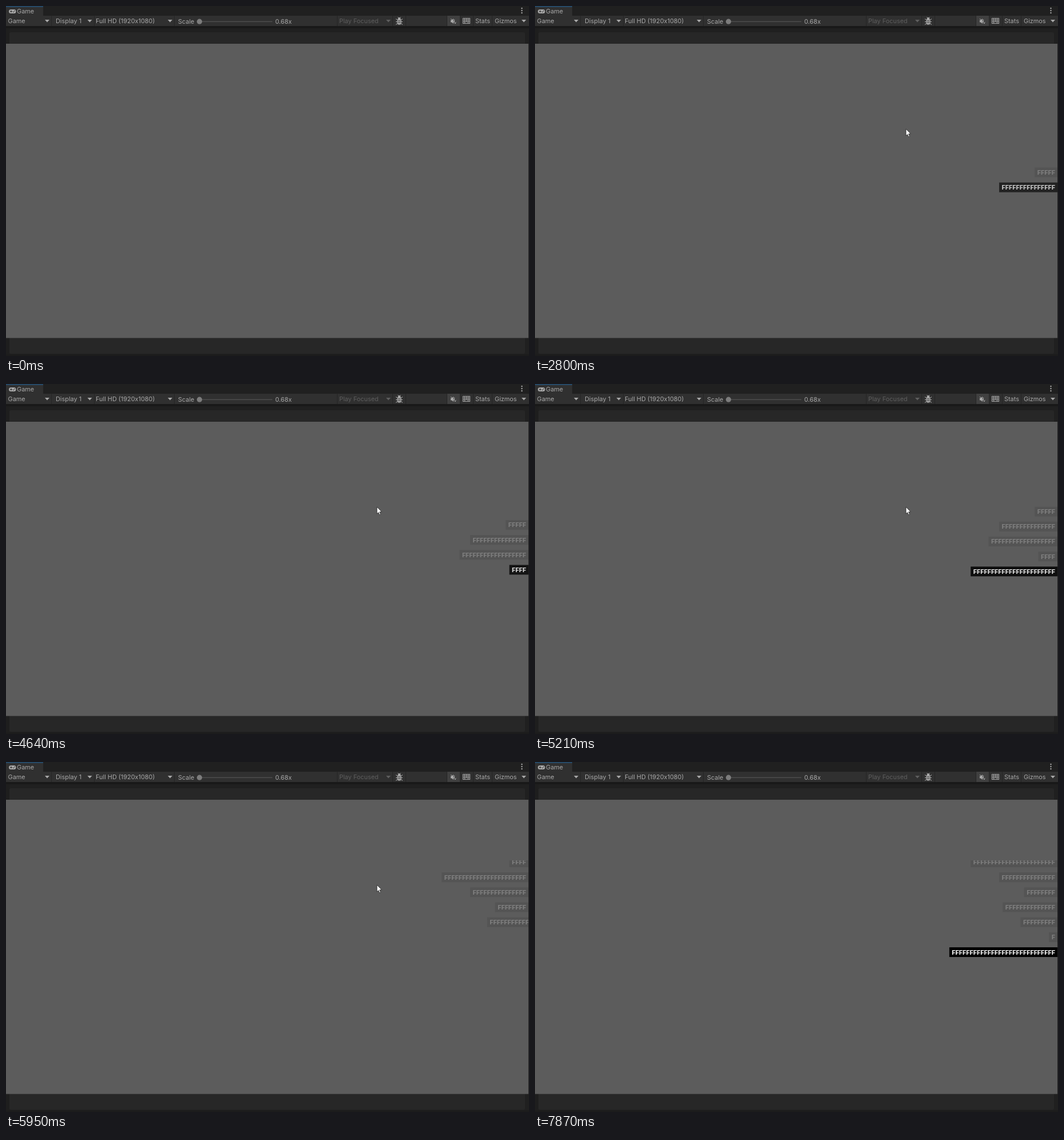
Animation of 915 by 612 pixels, one loop 8670 ms. Source, as an HTML page with a canvas:

```html
<!DOCTYPE html>
<html lang="en">
<head>
<meta charset="utf-8">
<title>Game view</title>
<style>
html, body { margin: 0; width: 100%; height: 100%; overflow: hidden; background: #202020; }
canvas { display: block; }
</style>
</head>
<body>
<canvas id="stage" width="915" height="612"></canvas>
<script>
const ctx = document.getElementById('stage').getContext('2d');
const LOOP = 8670, ROW = 26.17, SCROLL = 110, ARRIVE = 545, SPEED = 0.62;
const INK = '#a8a8a8', DIM = '#5e5e5e', BAR = '#303030';

const clamp = v => Math.min(1, Math.max(0, v));
const mix = (a, b, k) => a + (b - a) * k;
const ease = p => p < 0.5 ? 2 * p * p : 1 - 2 * (1 - p) ** 2;
const grey = v => `rgb(${v},${v},${v})`;

// Five slow, slightly uneven taps, then a quick burst that slows down.
function tapTime(i) {
  const k = i - 5;
  return k < 0 ? 910 + 929 * i + (i % 2 ? 27 : -27) : 5178 + 115 * k + 9 * k * k;
}

const messages = [5, 15, 18, 4, 23, 15, 8, 14, 9, 1, 29]
  .map((count, i) => ({ text: 'F'.repeat(count), start: tapTime(i) }));

function rect(x, y, w, h, color) {
  ctx.fillStyle = color;
  ctx.fillRect(x, y, w, h);
}

function round(x, y, w, h, r, color) {
  ctx.fillStyle = color;
  ctx.beginPath();
  ctx.roundRect(x, y, w, h, r);
  ctx.fill();
}

const dot = (x, y, r, color) => round(x - r, y - r, 2 * r, 2 * r, r, color);

function line(x1, y1, x2, y2, color = INK) {
  ctx.strokeStyle = color;
  ctx.lineWidth = 1;
  ctx.beginPath();
  ctx.moveTo(x1, y1);
  ctx.lineTo(x2, y2);
  ctx.stroke();
}

function shape(path, color) {
  ctx.fillStyle = color;
  ctx.fill(new Path2D(path));
}

function label(text, x, y, color = INK) {
  ctx.font = '10.9px Inter, sans-serif';
  ctx.textAlign = 'left';
  ctx.fillStyle = color;
  ctx.fillText(text, x, y);
}

const arrow = (x, color = INK) => shape(`M${x - 4} 24h8l-4 4.5z`, color);

function drawGamepad() {
  round(5, 6, 12.5, 7, 3.5, INK);
  rect(7, 9, 4, 1, BAR);
  rect(8.5, 7.5, 1, 4, BAR);
  dot(13, 10.4, 0.8, BAR);
  dot(15, 8.6, 0.8, BAR);
}

function drawBug() {
  round(684.4, 22.5, 7.2, 10, 3.6, INK);
  dot(688, 22.5, 2.4, INK);
  for (const side of [-1, 1]) {
    for (const slope of [-1, 0, 1]) {
      line(688, 27.5 + slope, 688 + side * 6, 27.5 + slope * 5);
    }
    line(688, 22, 688 + side * 2.5, 19.5);
  }
  for (const y of [26, 29]) line(685.5, y, 690.5, y, BAR);
}

function drawSpeaker() {
  shape('M778 24.5h2l3-2.5v9l-3-2.5h-2z', INK);
  line(784.5, 23.5, 784.5, 28);
  line(778, 22, 787, 31);
  line(784.5, 31, 787.5, 28);
}

function drawKeyboard() {
  ctx.strokeStyle = INK;
  ctx.strokeRect(799.5, 21.5, 12, 9);
  for (const y of [24.5, 27.5]) line(800, y, 811, y);
  for (let x = 802.5; x < 810; x += 3) line(x, 22, x, 27);
  for (const x of [802.5, 808.5]) line(x, 28, x, 30);
}

function drawWindow() {
  rect(0, 0, 915, 612, '#202020');
  rect(0, 0, 65, 18, BAR);
  rect(0, 0, 65, 2, '#274a68');
  rect(0, 17, 915, 18, BAR);
  rect(772, 17, 22, 18, '#404040');
  for (const x of [79, 154, 294, 579, 676, 699, 771, 794, 817, 850]) {
    rect(x, 17, 1, 18, '#252525');
  }
  rect(0, 35, 915, 4, '#191919');
  rect(0, 39, 6, 573, '#1e1e1e');
  round(6, 46, 902, 562, 3, '#272727');
  rect(0, 609, 915, 3, '#1c1c1c');
  rect(0, 66, 914, 514.5, '#5c5c5c');

  label('Game', 19, 13);
  label('Game', 3.5, 30);
  label('Display 1', 87, 30);
  label('Full HD (1920x1080)', 157, 30);
  label('Scale', 301, 31);
  label('0.68x', 471, 31);
  label('Play Focused', 583, 30, DIM);
  label('Stats', 821, 30);
  label('Gizmos', 855, 30);
  for (const x of [72, 146.5, 287, 906]) arrow(x);
  arrow(669, DIM);
  rect(343, 26.5, 123, 1.5, '#4c4c4c');
  dot(338.5, 27.2, 4.6, '#7c7c7c');
  for (const y of [4, 8, 12]) dot(902.5, y, 1.2, INK);
  drawGamepad();
  drawBug();
  drawSpeaker();
  drawKeyboard();
}

function drawMessages(t) {
  ctx.save();
  ctx.beginPath();
  ctx.rect(0, 172, 914, 408);
  ctx.clip();
  ctx.font = 'bold 11.36px Roboto, sans-serif';
  ctx.textAlign = 'right';
  messages.forEach(({ text, start }, i) => {
    if (t < start) return;
    // Each later message pushes this one up a row; the next one also dims it.
    const pushes = messages.slice(i + 1).map(m => clamp((t - m.start) / SCROLL));
    const y = 332.5 - ROW * pushes.reduce((sum, p) => sum + ease(p), 0);
    const fade = (pushes[0] || 0) ** 1.5;
    const right = 914 + Math.max(0, SPEED * (start + ARRIVE - t));
    const width = ctx.measureText(text).width + 8.5;
    rect(right - width, y - 8.5, width, 17, grey(mix(0, 84, fade)));
    ctx.fillStyle = grey(mix(255, 128, fade));
    ctx.fillText(text, right - 4, y + 4);
  });
  ctx.restore();
}

const curve = (a, b, c, k) => mix(mix(a, b, k), mix(b, c, k), k);

function drawPointer(t) {
  if (t < 180 || t > 6840) return;
  const come = 1 - (1 - clamp((t - 180) / 370)) ** 1.5;
  const go = clamp((t - 6330) / 510);
  ctx.save();
  if (go) ctx.translate(curve(649, 668, 572, go), curve(215, -78, -10, go));
  else ctx.translate(curve(504, 632, 649, come), curve(-2, 140, 215, come));
  const path = new Path2D('M0 0V12L2.6 9.6L4.4 13.6L6.4 12.7L4.6 8.8L8.3 8.6Z');
  ctx.fillStyle = '#fff';
  ctx.fill(path);
  ctx.strokeStyle = '#222';
  ctx.lineWidth = 0.8;
  ctx.stroke(path);
  ctx.restore();
}

function frame() {
  const t = performance.now() % LOOP;
  drawWindow();
  drawMessages(t);
  drawPointer(t);
  requestAnimationFrame(frame);
}
frame();
</script>
</body>
</html>
```
